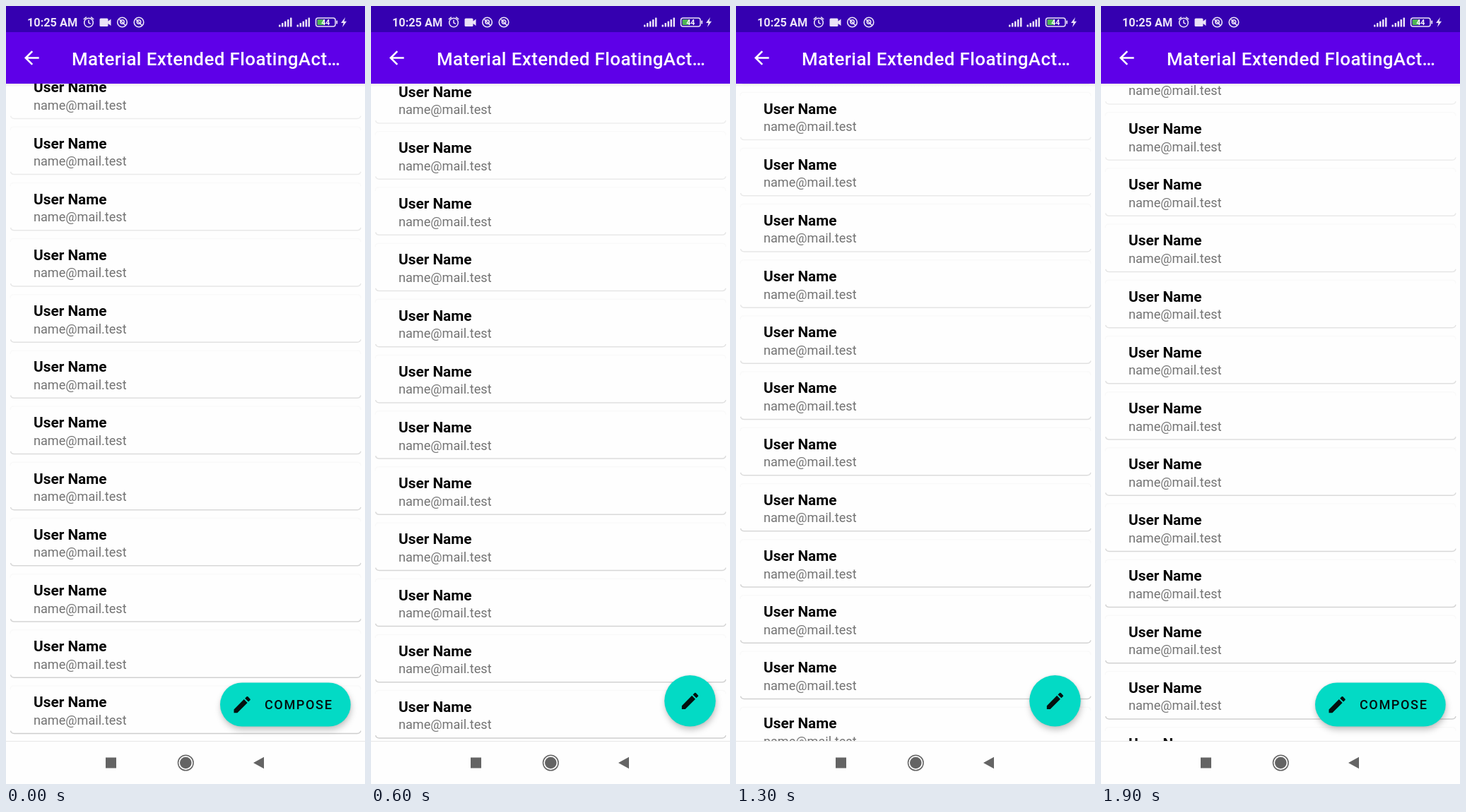
Recreate the animation shown at these times as an HTML page. Size 508x1102 px, loop 2000 ms.

```html
<!DOCTYPE html>
<html lang="en">
<head>
<meta charset="utf-8">
<title>Compose button</title>
<style>
  html, body { margin: 0; width: 100%; height: 100%; overflow: hidden; background: #fefefe; }
  svg { display: block; width: 100vw; height: 100vh; font-family: Roboto, sans-serif; }
  .name { font-size: 20.8px; font-weight: 700; fill: #050505; }
  .mail { font-size: 18.1px; fill: #737373; }
  .title { font-size: 25.9px; font-weight: 500; letter-spacing: .41px; fill: #fff; }
  .clock { font-size: 16.3px; font-weight: 700; fill: #ebe3f7; }
  .label { font-size: 18.1px; font-weight: 500; letter-spacing: 1.6px; fill: #04100f; }
  .edge { fill: none; stroke: #000; stroke-width: 1.5; }
  #fab { filter: drop-shadow(0 0 1.5px rgba(0, 0, 0, .1)) drop-shadow(1px 5px 4px rgba(0, 0, 0, .22)); }
</style>
</head>
<body>
<svg viewBox="0 0 508 1102" preserveAspectRatio="none">
  <defs>
    <clipPath id="listClip"><rect y="110" width="508" height="931"/></clipPath>
    <clipPath id="fabClip"><rect id="fabMask"/></clipPath>
    <linearGradient id="barShade" x2="0" y2="1">
      <stop stop-color="#000" stop-opacity=".06"/>
      <stop offset="1" stop-color="#000" stop-opacity="0"/>
    </linearGradient>
  </defs>
  <rect width="508" height="1102" fill="#fefefe"/>
  <g id="list" clip-path="url(#listClip)"></g>

  <rect id="fab" fill="#03dac5"/>
  <g clip-path="url(#fabClip)"><text id="label" class="label">COMPOSE</text></g>
  <path id="pencil" d="M3 17.25V21h3.75L17.81 9.94l-3.75-3.75L3 17.25zM20.71 7.04a1 1 0 0 0 0-1.41l-2.34-2.34a1 1 0 0 0-1.41 0l-1.83 1.83 3.75 3.75 1.83-1.83z" fill="#04100f"/>

  <rect y="110" width="508" height="5" fill="url(#barShade)"/>
  <rect width="508" height="37.5" fill="#3500b0"/>
  <rect y="37" width="508" height="73" fill="#5e00e8"/>
  <path transform="translate(20.8 58) scale(1.293)" d="M20 11H7.83l5.59-5.59L12 4l-8 8 8 8 1.41-1.41L7.83 13H20z" fill="#fff"/>
  <text class="title" x="93" y="83.5">Material Extended FloatingAct…</text>

  <text class="clock" x="30" y="28.7">10:25 AM</text>
  <g fill="none" stroke="#ebe3f7" stroke-width="1.6">
    <circle cx="117" cy="23.5" r="6.3"/>
    <path d="M117 19.8v4l2.8 1.6M109.8 19l4-3.3M124.2 19l-4-3.3"/>
    <g id="badges"></g>
  </g>
  <g fill="#ebe3f7">
    <path d="M134 17.5h9q1.5 0 1.5 1.5v2.5l4-3v9.5l-4-3v2.5q0 1.500-1.500 1.500h-9q-1.500 0-1.500-1.500v-8.500q0-1.500 1.500-1.500z"/>
    <g id="signal"></g>
    <path d="M480 16l-6 8h3.500l-1.500 6 6-8.200h-3.600z"/>
    <rect x="467.300" y="20.500" width="1.800" height="5" rx=".8"/>
  </g>
  <rect x="438.500" y="17" width="27.500" height="12" rx="3" fill="none" stroke="#ebe3f7" stroke-width="1.500"/>
  <rect x="440.500" y="19" width="10.500" height="8" rx="1" fill="#4fb653"/>
  <text x="452.300" y="26.800" text-anchor="middle" font-size="10.500" font-weight="700" fill="#fff">44</text>

  <rect y="1041" width="508" height="61" fill="#fefefe"/>
  <path d="M0 1041.5H508" stroke="#e7e7e7"/>
  <g fill="#646464">
    <rect x="141" y="1064.500" width="15" height="15"/>
    <circle cx="254.300" cy="1072" r="8.300"/>
    <circle cx="254.300" cy="1072" r="10.800" fill="none" stroke="#646464" stroke-width="1.500"/>
    <path d="M350 1072l15-8.200v16.400z"/>
  </g>
</svg>
<script>
const LOOP = 2000, STEP = 100, PITCH = 79.18, ROWS = 14;
const $ = id => document.getElementById(id);

function add(parent, tag, attrs, text) {
  const el = document.createElementNS('http://www.w3.org/2000/svg', tag);
  set(el, attrs);
  if (text) el.textContent = text;
  return parent.appendChild(el);
}
function set(el, attrs) {
  for (const k in attrs) el.setAttribute(k, attrs[k]);
}
const clamp = v => Math.min(1, Math.max(0, v));
const mix = (a, b, p) => a + (b - a) * p;
const smooth = p => p * p * (3 - 2 * p);

// status bar icons
for (const x of [164.5, 188]) {
  add($('badges'), 'circle', { cx: x, cy: 23, r: 6.8 });
  add($('badges'), 'circle', { cx: x, cy: 22.5, r: 2.7 });
  add($('badges'), 'path', { d: `M${x - 4} 19l8.5 8.5` });
}
for (const x of [386, 411.5])
  for (let i = 0; i < 5; i++) {
    const h = 3 + i * 2.5;
    add($('signal'), 'rect', { x: x + i * 4, y: 29.5 - h, width: 2.5, height: h, rx: .6 });
  }

const rows = Array.from({ length: ROWS }, () => {
  const g = add($('list'), 'g', {});
  add(g, 'path', { class: 'edge', d: 'M6-18q0-5 5-5H497q5 0 5 5', opacity: .018 });
  const edge = add(g, 'path', { class: 'edge', d: 'M6.5 40.6q1 3.8 5 3.8H497q4 0 5-3.8' });
  add(g, 'text', { class: 'name', x: 39, y: 7.3 }, 'User Name');
  add(g, 'text', { class: 'mail', x: 39, y: 31.9 }, 'name@mail.test');
  return { g, edge };
});

// time, list offset, easing power towards this key (0 = smooth)
const scroll = [
  [0, 194.2, 1], [330, 121.3, 0], [600, 121.6, 1], [1000, 130.2, 2],
  [1300, 145.2, 1.6], [1500, 231.2, 1.1], [1900, 332.1, .9], [2000, 352.5, 1]
];

function offsetAt(t) {
  const i = scroll.findIndex((k, n) => n && t <= k[0]);
  const [t0, y0] = scroll[i - 1], [t1, y1, pow] = scroll[i];
  const p = (t - t0) / (t1 - t0);
  return mix(y0, y1, pow ? p ** pow : smooth(p));
}

// 1 = wide with label, 0 = round
function widthAt(t) {
  if (t < 1000) return 1 - smooth(clamp((t - 80) / 230));
  return smooth(clamp((t - 1310) / 204));
}

function draw(t) {
  const first = offsetAt(t) % PITCH;
  rows.forEach(({ g, edge }, i) => {
    const y = first + i * PITCH;
    set(g, { transform: `translate(0 ${y.toFixed(2)})` });
    set(edge, { opacity: mix(.05, .19, clamp(y / 1000)) });
  });

  const p = widthAt(t), left = mix(415.2, 303, p), h = mix(72.5, 62, p);
  const box = { x: left, y: 1020.5 - h, width: 487.7 - left, height: h, rx: h / 2 };
  const mid = 1020.5 - h / 2;
  set($('fab'), box);
  set($('fabMask'), box);
  set($('label'), { x: left + 62.9, y: mid + 6.8, opacity: clamp(p * 2 - .9) });
  const iconX = left + mix(36.25, 31.1, p);
  set($('pencil'), { transform: `translate(${iconX - 15.5} ${mid - 15.4}) scale(1.293)` });
}

const start = performance.now();
function tick() {
  const t = (performance.now() - start) % LOOP;
  draw(Math.floor(t / STEP) * STEP); // ten pictures a second
  requestAnimationFrame(tick);
}
draw(0);
requestAnimationFrame(tick);
</script>
</body>
</html>
```
